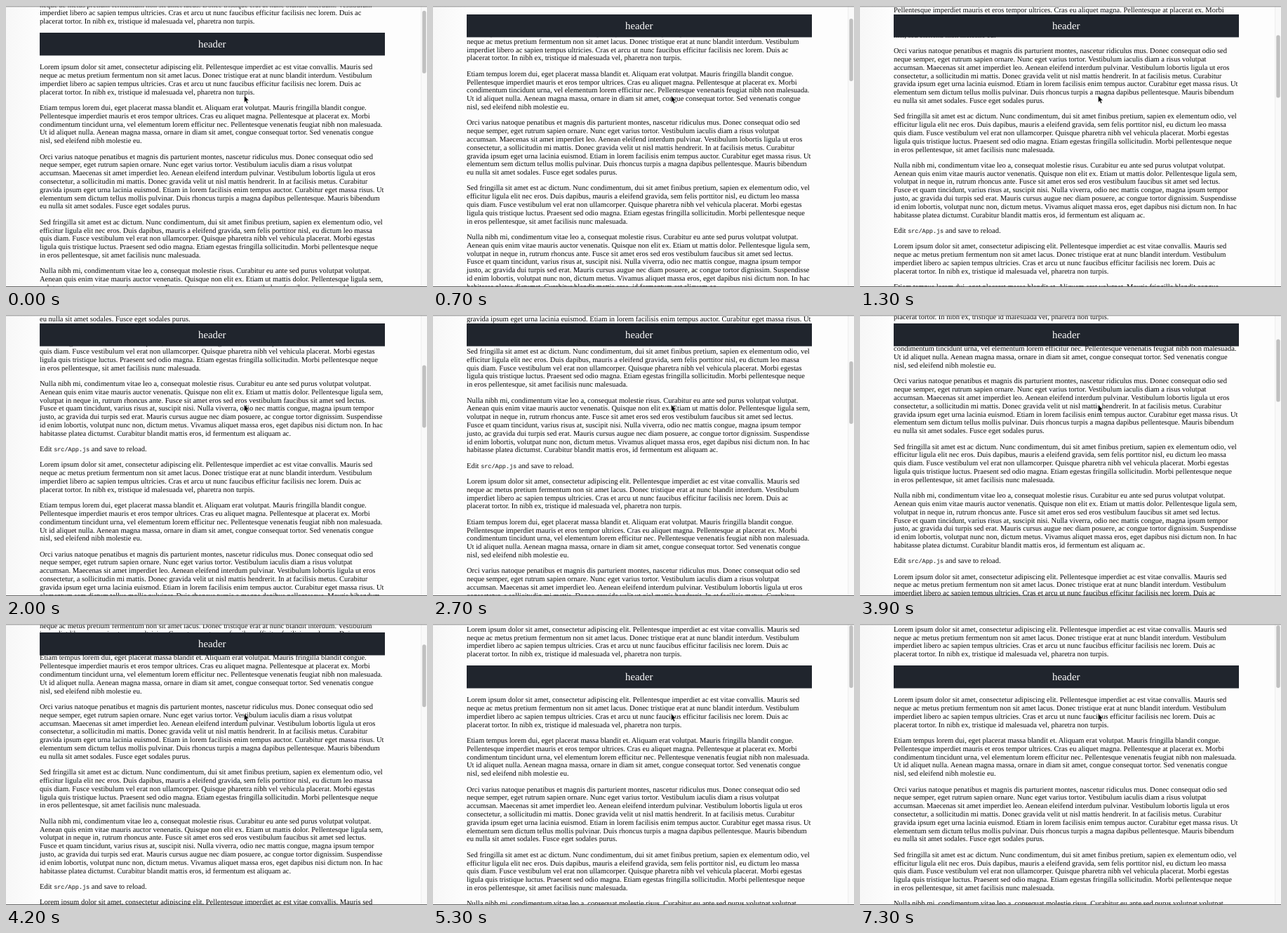
These frames come from a looping animation (600 by 400 pixels, 7.5 s). An HTML page:

```html
<!DOCTYPE html>
<html lang="la">
<head>
<meta charset="utf-8">
<title>Sticky header</title>
<style>
html, body { margin: 0; width: 100%; height: 100%; overflow: hidden; background: #fdfdfd; }
svg { display: block; width: 600px; height: 400px; }
text { font: 10.5px "Liberation Serif", "Times New Roman", serif; text-rendering: geometricPrecision; white-space: pre; }
.code { font: 8.53px "Liberation Mono", "Courier New", monospace; }
#bar text { font-size: 14.8px; fill: #fff; text-anchor: middle; }
</style>
</head>
<body>
<svg viewBox="0 0 600 400">
  <defs>
    <linearGradient id="side">
      <stop offset="0" stop-color="#f7f7f7"/><stop offset="1" stop-color="#fdfdfd"/>
    </linearGradient>
    <linearGradient id="edge" x2="0" y2="1">
      <stop offset="0" stop-color="#999"/><stop offset="1" stop-color="#999" stop-opacity="0"/>
    </linearGradient>
  </defs>
  <rect width="600" height="400" fill="#fdfdfd"/>
  <rect width="48" height="400" fill="url(#side)"/>
  <g id="page" fill="#080808"></g>
  <g id="bar">
    <rect x="48" width="492" height="32.5" fill="#20252d"/>
    <text x="293.8" y="21.2">header</text>
  </g>
  <rect x="591.5" width="8.5" height="400" fill="#f9f9f9"/>
  <rect x="591.5" width=".6" height="400" fill="#e6e6e6"/>
  <rect id="thumb" x="593.3" width="5.4" height="89" rx="2.7" fill="#c0c0c0"/>
  <rect width="600" height="2.5" fill="url(#edge)"/>
  <rect y="399" width="600" height="1" fill="#666"/>
  <path d="M339.4 127.6V137.4L341.6 135.4L343.1 138.9L344.9 138.1L343.4 134.7H346.4Z" fill="#000" stroke="#fff" stroke-width=".7"/>
</svg>
<script>
const LINE = 11.81, GAP = 10.5, LEFT = 48, HEAD_Y = 59, STICK_Y = 12, LOOP = 7500;
const NS = "http://www.w3.org/2000/svg";
const page = document.getElementById("page");
const bar = document.getElementById("bar");
const thumb = document.getElementById("thumb");

const lorem = `Lorem ipsum dolor sit amet, consectetur adipiscing elit. Pellentesque imperdiet ac est vitae convallis. Mauris sed
neque ac metus pretium fermentum non sit amet lacus. Donec tristique erat at nunc blandit interdum. Vestibulum
imperdiet libero ac sapien tempus ultricies. Cras et arcu ut nunc faucibus efficitur facilisis nec lorem. Duis ac
placerat tortor. In nibh ex, tristique id malesuada vel, pharetra non turpis.`;

const body = `${lorem}

Etiam tempus lorem dui, eget placerat massa blandit et. Aliquam erat volutpat. Mauris fringilla blandit congue.
Pellentesque imperdiet mauris et eros tempor ultrices. Cras eu aliquet magna. Pellentesque at placerat ex. Morbi
condimentum tincidunt urna, vel elementum lorem efficitur nec. Pellentesque venenatis feugiat nibh non malesuada.
Ut id aliquet nulla. Aenean magna massa, ornare in diam sit amet, congue consequat tortor. Sed venenatis congue
nisl, sed eleifend nibh molestie eu.

Orci varius natoque penatibus et magnis dis parturient montes, nascetur ridiculus mus. Donec consequat odio sed
neque semper, eget rutrum sapien ornare. Nunc eget varius tortor. Vestibulum iaculis diam a risus volutpat
accumsan. Maecenas sit amet imperdiet leo. Aenean eleifend interdum pulvinar. Vestibulum lobortis ligula ut eros
consectetur, a sollicitudin mi mattis. Donec gravida velit ut nisl mattis hendrerit. In at facilisis metus. Curabitur
gravida ipsum eget urna lacinia euismod. Etiam in lorem facilisis enim tempus auctor. Curabitur eget massa risus. Ut
elementum sem dictum tellus mollis pulvinar. Duis rhoncus turpis a magna dapibus pellentesque. Mauris bibendum
eu nulla sit amet sodales. Fusce eget sodales purus.

Sed fringilla sit amet est ac dictum. Nunc condimentum, dui sit amet finibus pretium, sapien ex elementum odio, vel
efficitur ligula elit nec eros. Duis dapibus, mauris a eleifend gravida, sem felis porttitor nisl, eu dictum leo massa
quis diam. Fusce vestibulum vel erat non ullamcorper. Quisque pharetra nibh vel vehicula placerat. Morbi egestas
ligula quis tristique luctus. Praesent sed odio magna. Etiam egestas fringilla sollicitudin. Morbi pellentesque neque
in eros pellentesque, sit amet facilisis nunc malesuada.

Nulla nibh mi, condimentum vitae leo a, consequat molestie risus. Curabitur eu ante sed purus volutpat volutpat.
Aenean quis enim vitae mauris auctor venenatis. Quisque non elit ex. Etiam ut mattis dolor. Pellentesque ligula sem,
volutpat in neque in, rutrum rhoncus ante. Fusce sit amet eros sed eros vestibulum faucibus sit amet sed lectus.
Fusce et quam tincidunt, varius risus at, suscipit nisi. Nulla viverra, odio nec mattis congue, magna ipsum tempor
justo, ac gravida dui turpis sed erat. Mauris cursus augue nec diam posuere, ac congue tortor dignissim. Suspendisse
id enim lobortis, volutpat nunc non, dictum metus. Vivamus aliquet massa eros, eget dapibus nisi dictum non. In hac
habitasse platea dictumst. Curabitur blandit mattis eros, id fermentum est aliquam ac.

Edit \`src/App.js\` and save to reload.`;

function addLine(str, y) {
  const el = document.createElementNS(NS, "text");
  el.setAttribute("x", LEFT);
  el.setAttribute("y", y);
  // Backticks mark inline code
  str.split("`").forEach((part, i) => {
    const span = document.createElementNS(NS, "tspan");
    if (i % 2) span.setAttribute("class", "code");
    span.textContent = part;
    el.append(span);
  });
  page.append(el);
}

function addText(str, y) {
  for (const para of str.split("\n\n")) {
    for (const line of para.split("\n")) {
      addLine(line, y);
      y += LINE;
    }
    y += GAP;
  }
  return y;
}

addText(lorem, 10.8);
addText(body, addText(body, 111.3));

// Scroll position: time in ms, offset in px
const keys = [[0, 21], [700, 69.3], [2000, 300.4], [2250, 322], [3300, 181.2], [4200, 117.6], [4900, 0], [LOOP, 0]];

const slope = i => (keys[i + 1][1] - keys[i][1]) / (keys[i + 1][0] - keys[i][0]);

// Monotone tangent: harmonic mean of the neighbouring slopes
function tangent(i) {
  if (i === 0) return slope(0) * 0.8;
  if (i === keys.length - 1) return 0;
  const a = slope(i - 1), b = slope(i);
  return a * b > 0 ? 2 * a * b / (a + b) : 0;
}

function scrollAt(t) {
  let i = 0;
  while (i < keys.length - 2 && t >= keys[i + 1][0]) i++;
  const [t0, a] = keys[i], [t1, b] = keys[i + 1];
  const h = t1 - t0, u = (t - t0) / h, v = 1 - u;
  return v * v * (1 + 2 * u) * a + u * u * (3 - 2 * u) * b
    + h * u * v * (v * tangent(i) - u * tangent(i + 1));
}

function draw(t) {
  const s = scrollAt(Math.floor(t / 100) * 100);
  page.setAttribute("transform", `translate(0 ${-s})`);
  bar.setAttribute("transform", `translate(0 ${Math.max(STICK_Y, HEAD_Y - s)})`);
  thumb.setAttribute("y", 2 + s * 0.231);
}

const start = performance.now();
function tick() {
  draw((performance.now() - start) % LOOP);
  requestAnimationFrame(tick);
}
tick();
</script>
</body>
</html>
```
